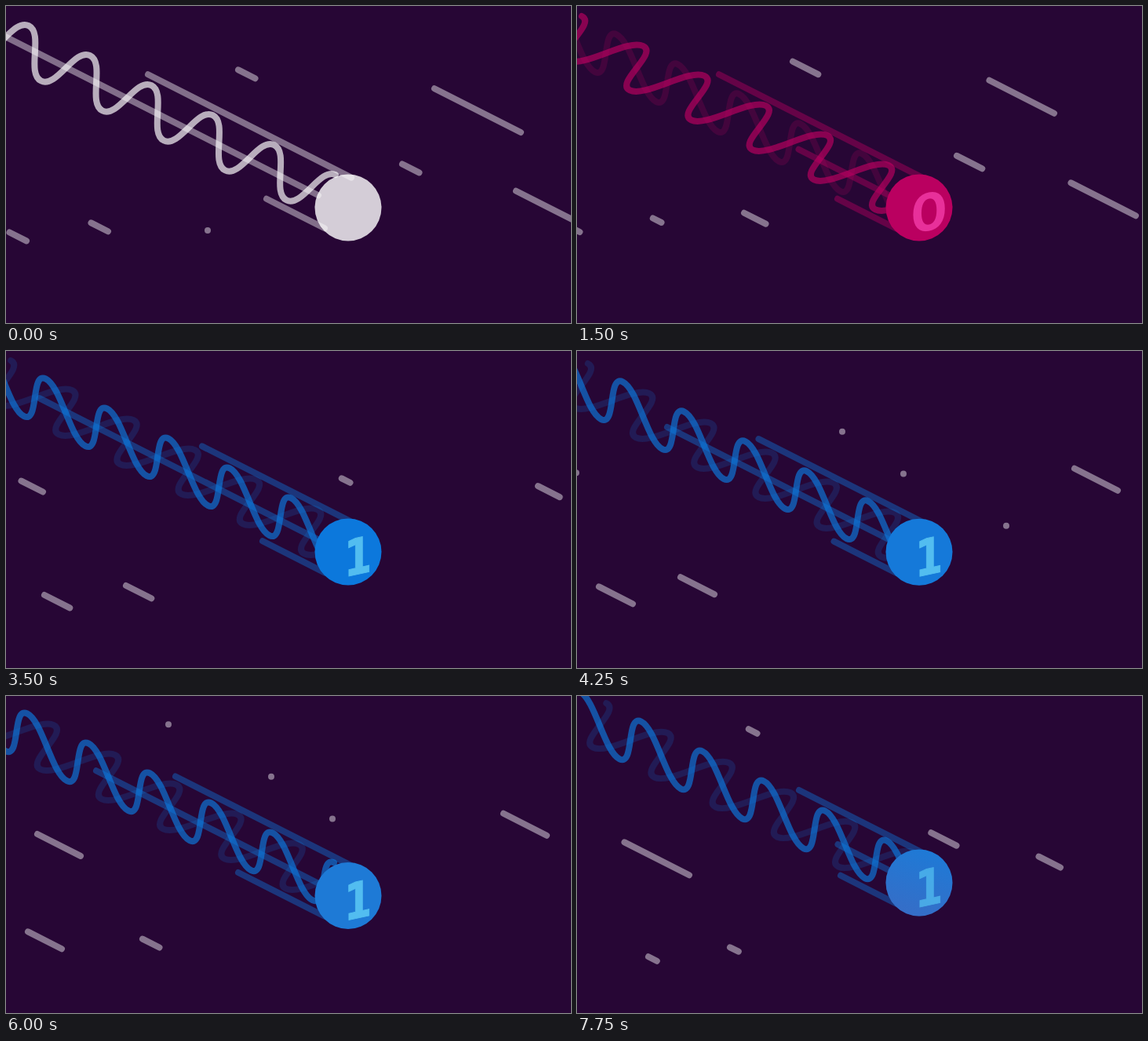
An HTML page for the animation above (8000 ms loop, 720x404 px).

```html
<!DOCTYPE html>
<html lang="en">
<head>
<meta charset="utf-8">
<title>Comet bit</title>
<style>
  html, body { margin: 0; width: 100%; height: 100%; overflow: hidden; background: #270635; }
  svg { display: block; width: 720px; height: 404px; }
  path { fill: none; stroke-linecap: round; }
  #zero { font: bold 66px Inter, sans-serif; }
  #one { font: bold 64px "DejaVu Sans", sans-serif; }
</style>
</head>
<body>
<svg viewBox="0 0 720 404">
  <defs>
    <linearGradient id="shade" x1=".65" y1="0" x2=".35" y2="1">
      <stop offset="0" stop-color="#5a5ab0" stop-opacity="0"/>
      <stop offset="1" stop-color="#5a5ab0" stop-opacity=".4"/>
    </linearGradient>
    <clipPath id="behind"><rect y="-50" width="432" height="500"/></clipPath>
  </defs>
  <rect width="720" height="404" fill="#270635"/>
  <path id="streaks" stroke="#fff" stroke-opacity=".44" stroke-width="8"/>
  <g id="comet">
    <path id="ghost" stroke-opacity=".19" stroke-width="8" clip-path="url(#behind)"/>
    <path id="tail" stroke-opacity=".42" stroke-width="8"/>
    <path id="wave" stroke-opacity=".67" stroke-width="8" clip-path="url(#behind)"/>
    <circle id="ball" cx="436" cy="257" r="42.5"/>
    <circle id="dusk" cx="436" cy="257" r="42.5" fill="url(#shade)"/>
    <text id="zero" y="24" text-anchor="middle" fill="#e8309a">0</text>
    <text id="one" transform="matrix(.79 -.17 0 1 431 289.2)" fill="#52bdf0" stroke="#52bdf0">1</text>
  </g>
</svg>
<script>
const $ = id => document.getElementById(id);
const set = (id, attrs) => {
  for (const name in attrs) $(id).setAttribute(name, attrs[name]);
};
const mod = (a, b) => ((a % b) + b) % b;
const clamp = v => Math.max(0, Math.min(1, v));
const mix = (a, b, p) => a + (b - a) * p;
const at = (x, y) => x.toFixed(1) + ' ' + y.toFixed(1);
const seg = (x1, y1, x2, y2) => `M${at(x1, y1)}L${at(x2, y2)}`;

const LOOP = 8000, HOLD = 250, FPS = 25;
const SLOPE = 0.507, CYCLE = 18, RUN = 8;

// Streak sizes: full travel, then head and rear travel at mid run
const SMALL = [131, 84, 41], BIG = [258, 176, 66];
// Lanes: start x, y at x = 0, frame offset, size
const LANES = [
  [338, -68.7, 2, SMALL], [722, -171.6, 4, BIG], [547, -54.5, 10, SMALL],
  [826, -93.8, 12, BIG], [112, 286.2, 6, SMALL], [216, 221.4, 14, SMALL],
  [257, 155.7, 0, BIG]
];

function streak([x, c, , [span, head, rear]], k) {
  const go = half => k < 4 ? half * k / 4 : mix(half, span, k / 4 - 1);
  const a = x - go(head), b = x - go(rear);
  return seg(a, c + SLOPE * a, b, c + SLOPE * b);
}

// Every lane fires twice per cycle, then rests briefly
function streaks(n) {
  let d = '';
  for (const lane of LANES) {
    const q = mod(n + lane[2], CYCLE);
    if (q <= RUN) d += streak(lane, q);
    if (q >= RUN && q <= 2 * RUN) d += streak(lane, q - RUN);
  }
  return d;
}

// Swing is the offset of each crest from the axis, which may lean
const SWING = { both: [-11.6, 25.7], zero: [-28, 18.7], one: [5.8, 33.4] };
const PERIOD = 78.2, TILT = 0.486, HALVES = 12;

function wave([dx, dy], shift) {
  const half = PERIOD / 2, grip = half / 2;
  let d = '';
  for (let k = 0; k <= HALVES; k++) {
    const side = k % 2 ? 1 : -1, along = shift + half * (k - 0.5);
    const x = along - 2.4 + side * dx, y = 41.2 + along * TILT + side * dy;
    d += k ? `S${at(x - grip, y - grip * TILT)} ${at(x, y)}`
           : `M${at(x, y)}C${at(x + grip, y + grip * TILT)} `;
    if (k === 1) d = d.replace('S', '');
  }
  return d;
}

function between(points, v) {
  const i = points.findIndex(p => p[0] > v), [a, b] = [points[i - 1], points[i]];
  return mix(a[1], b[1], (v - a[0]) / (b[0] - a[0]));
}

const TOP = [[0, 181], [1, 181], [6, 216], [8, 225], [13, 283], [15, 250], [17, 213], [18, 181]];
const LOW = [[0, 332], [1, 332], [6, 296], [8, 308], [13, 336], [15, 327], [17, 328], [18, 332]];

function tail(n, state) {
  const q = mod(n, CYCLE);
  const reach = Math.abs(mod(n - state.low + 5, 10) - 5);
  const line = (from, x, y) => seg(from, y - SLOPE * (x - from), x, y);
  return line(between(TOP, q), 440, 218.6) +
         line(reach * state.pull - 30, 398, 241.3) +
         line(between(LOW, q), 406, 283.3);
}

const STATES = [
  { until: 3, color: '#fff', main: 'both', lag: -15.5, low: 0, pull: 72.5 },
  { until: 12, color: '#ba0060', main: 'zero', other: 'one', lag: 0, low: 2, pull: 62.5 },
  { until: 99, color: '#0c78dc', main: 'one', other: 'zero', lag: 0, low: 8, pull: 72.5 }
];

function draw(ms) {
  const i = Math.floor((ms % LOOP) / HOLD);
  const n = Math.floor(i * HOLD * FPS / 1000);
  const state = STATES.find(s => i < s.until);
  const { main, other, color } = state;

  set('streaks', { d: streaks(n) });

  const bob = n > 62 && n < 125 ? -Math.sin(Math.PI * (n - 62) / 63) : 0;
  const lift = -19 * clamp((i - 20) / 11) ** 2;
  set('comet', { transform: `translate(0 ${(bob + lift).toFixed(2)})` });

  const shift = mod(45 + state.lag - (n - 37) * PERIOD / 10, PERIOD) - 45;
  set('wave', { d: wave(SWING[main], shift), stroke: color });
  set('ghost', { d: other ? wave(SWING[other], shift) : '', stroke: color });
  set('tail', { d: tail(n, state), stroke: color });

  const p = clamp((i - 14) / 6);
  const blue = `rgb(${mix(12, 30, p)},${mix(120, 122, p)},${mix(220, 214, p)})`;
  set('ball', { fill: main === 'one' ? blue : color, 'fill-opacity': main === 'both' ? 0.8 : 1 });

  const fade = clamp((i - 24) / 7);
  set('dusk', { opacity: fade });
  const grow = 1.035 - 0.035 * Math.cos(Math.PI * (n - 37) / 25);
  set('zero', {
    opacity: main === 'zero' ? 1 : 0,
    transform: `matrix(${1.05 * grow} ${-0.2 * grow} 0 ${grow} 448.5 262)`
  });
  set('one', { opacity: main === 'one' ? 1 - 0.25 * fade : 0 });
}

const start = performance.now();
function tick() {
  draw(performance.now() - start);
  requestAnimationFrame(tick);
}
tick();
</script>
</body>
</html>
```
